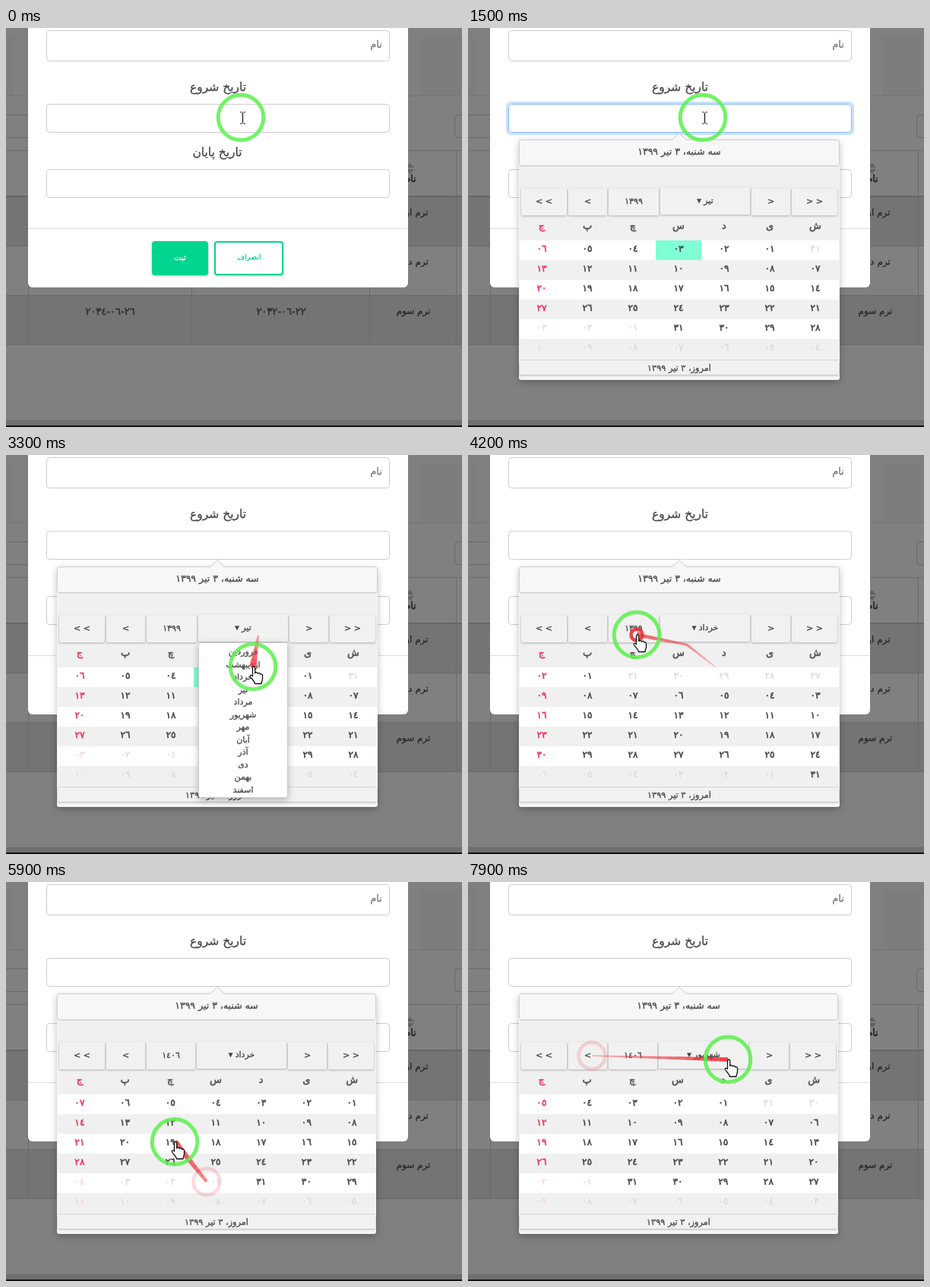
An HTML page that plays this animation: 600x526 px, repeating every 8 s.

```html
<!DOCTYPE html>
<html lang="fa">
<head>
<meta charset="utf-8">
<title>Date picker</title>
<style>
  html, body { margin: 0; width: 100%; height: 100%; overflow: hidden; background: #808080; }
  svg { display: block; width: 600px; height: 526px; }
  text { font-family: "DejaVu Sans", sans-serif; text-anchor: middle; direction: rtl; white-space: pre; stroke-width: .3px; }
  .heavy { stroke-width: .6px; }
  .ltr { direction: ltr; unicode-bidi: bidi-override; }
  .btn { filter: drop-shadow(.5px 1px 1.5px rgba(0, 0, 0, .27)); }
  .pop { filter: drop-shadow(0 3px 5px rgba(0, 0, 0, .25)); }
</style>
</head>
<body>
<svg viewBox="0 0 600 526">
  <g id="page"></g>
  <g id="form"></g>
  <g id="picker"></g>
  <g id="trail"></g>
  <circle id="click" fill="none" stroke="#e8282c" stroke-width="4.5"/>
  <g id="pointer">
    <circle r="29.8" fill="none" stroke="#5cf04f" stroke-width="5" opacity=".86"/>
    <path id="beam" d="M-1 -7h2.5m2 0h2.5M2.5 -6.5v14M-1 8h2.5m2 0h2.5" fill="none" stroke="#111" stroke-width="1.2"/>
    <path id="hand" transform="translate(-1.500 0)" d="M1 1.5C1-.5 4-.5 4.200 1.500V8.500C5 7 7.500 7.300 7.700 9 8.800 7.800 10.800 8.300 11 10 12.400 9.200 14 9.800 14 11.500V16C14 18.500 12.500 19.500 12.500 22.500H4C3.800 19.500 0 16.500-2 13.500-3 11.500-1 10.500 1 12.500Z" fill="#fff" stroke="#111" stroke-width="1.3" stroke-linejoin="round"/>
  </g>
</svg>
<script>
const LOOP = 8000, STEP = 100;
const MONTHS = ["فروردین", "اردیبهشت", "خرداد", "تیر", "مرداد", "شهریور", "مهر", "آبان", "آذر", "دی", "بهمن", "اسفند"];
const DAYS = ["ش", "ی", "د", "س", "چ", "پ", "ج"];
const GREEN = "#00d68f", INK = "#484848";
const $ = id => document.getElementById(id);

// time, x, y of the ring's middle
const PATH = [
  [0, 309, 118], [1900, 309, 118], [2100, 325, 218], [2300, 375, 235], [2400, 363, 230],
  [2600, 338, 238], [3000, 332, 238], [3300, 325, 279], [3850, 325, 279], [3980, 288, 250],
  [4120, 222, 237], [4700, 222, 237], [4970, 237, 296], [5180, 249, 362], [5300, 264, 395],
  [5700, 264, 395], [6100, 180, 290], [6350, 105, 226], [6550, 163, 228], [7560, 163, 229],
  [7900, 342, 234], [8000, 345, 234]
];
const CLICKS = [1000, 2800, 3400, 4200, 5500, 6700, 7100, 7500];

// start, view, year, month index, weekday of day 1
const VIEWS = [
  [0, "none"],
  [1200, "days", 1399, 3, 1],
  [2900, "menu", 1399, 3, 1],
  [3500, "days", 1399, 2, 5],
  [4400, "years"],
  [5600, "days", 1406, 2, 0],
  [6900, "days", 1406, 3, 3],
  [7200, "days", 1406, 4, 6],
  [7600, "days", 1406, 5, 2]
];

const digits = v => String(v).replace(/\d/g, d => String.fromCharCode(0x660 + +d));
const two = n => String(n).padStart(2, "0");
const rect = (x, y, w, h, fill, more = "") =>
  `<rect x="${x}" y="${y}" width="${w}" height="${h}" fill="${fill}" ${more}/>`;
const line = (x1, y1, x2, y2, color, w = 1, more = "") =>
  `<path d="M${x1} ${y1}L${x2} ${y2}" stroke="${color}" stroke-width="${w}" ${more}/>`;
// y is the visual middle of the line
const text = (s, x, y, size, fill = INK, more = "") =>
  `<text x="${x}" y="${(y + size * .36).toFixed(1)}" font-size="${size}" fill="${fill}" stroke="${fill}" ${more}>${digits(s)}</text>`;
const HEAVY = 'class="heavy"', LTR = 'class="ltr"';

function drawPage() {
  let s = rect(0, 0, 600, 526, "#808080");
  s += rect(0, 10, 10, 79, "#7d7d7d") + rect(545, 10, 55, 79, "#7d7d7d");
  s += line(0, 89.5, 600, 89.5, "#737373");
  const box = 'rx="4" stroke="#686868"';
  s += rect(-60.5, 114.5, 120, 30, "#808080", box) + rect(590.5, 114.5, 60, 30, "#808080", box);
  s += rect(0, 222, 600, 65, "#747474") + rect(0, 352, 600, 65, "#747474");
  for (const y of [161.5, 287.5, 352.5, 417.5]) s += line(0, y, 600, y, "#6a6a6a");
  s += line(0, 222, 600, 222, "#666", 2);
  for (const x of [29.5, 244.5, 478.5, 592.5]) s += line(x, 161, x, 417, "#6a6a6a");
  s += '<path d="M526 184l5.5-6 5.5 6zM526 186l5.5 6 5.5-6z" fill="#626262"/>';
  s += text("نام", 532, 198, 12.5, "#222", HEAVY);
  ["اول", "دوم", "سوم"].forEach((n, i) => s += text("ترم " + n, 536, 243 + 65 * i, 12, "#282828"));
  s += text("2034-06-26", 137, 373, 13, "#282828", LTR) + text("2032-06-22", 362, 373, 13, "#282828", LTR);
  s += rect(0, 517, 600, 7, "#6f6f6f") + rect(0, 524, 600, 2, "#111");
  $("page").innerHTML = s;
}

function drawForm() {
  const field = (y, h, id = "") => rect(53.5, y + .5, 451, h, "#fff", `rx="4" stroke="#ccc" ${id}`);
  $("form").innerHTML =
    rect(29, -20, 500, 362, "#fff", 'rx="6"') +
    field(3, 40) + text("نام", 487, 21.5, 13, "#777") +
    text("تاریخ شروع", 279, 77, 15.5) +
    rect(51.5, 98.5, 455, 41, "none", 'id="glow" rx="5" stroke="#c9e1fb" stroke-width="3"') +
    field(100, 37, 'id="start"') +
    line(491.5, 106, 491.5, 133, "#333", 1, 'id="caret"') +
    text("تاریخ پایان", 278, 163, 15.5) + field(186, 37) +
    line(29, 264.5, 529, 264.5, "#ddd") +
    `<g class="btn">${rect(192, 281, 74, 45, GREEN, 'rx="4"')}</g>` +
    text("ثبت", 229, 302, 10, "#fff") +
    `<g class="btn">${rect(275, 282, 89, 43, "#fff", `rx="3" stroke="${GREEN}" stroke-width="2"`)}</g>` +
    text("انصراف", 320, 302, 9.5, GREEN);
}

const panel = (w, h, fill, radius) =>
  `<g class="pop">${rect(67, 147, w, h, fill, `rx="${radius}"`)}</g>` +
  rect(67.5, 147.5, w - 1, 34, "#f7f7f7", 'rx="3" stroke="#d0d0d0"') +
  '<path d="M268 148l10-9.5 10 9.5" fill="#f7f7f7" stroke="#ccc"/>';

const button = (x, w, label, more = "", y = 211, fill = "#f1f1f1") =>
  `<g class="btn">${rect(x, y, w, 36, fill, 'rx="2"')}</g>` + text(label, x + w / 2, y + 16.5, 11, "#444", more);

function drawDays(w, year, month, first, pressed) {
  const mid = 67 + w / 2, shift = w - 422, col = (w - 2) / 7;
  let s = panel(w, 317, "#f5f5f5", 3);
  s += text("سه شنبه، 3 تیر 1399", mid, 162.5, 12.5);
  s += rect(68, 184, w - 2, 96, "#f0f0f0") + line(68, 182.5, 66 + w, 182.5, "#ddd");
  s += button(70, 60, "&lt; &lt;", LTR);
  s += button(132, 51, "&lt;", LTR, 211, pressed ? "#c9c9c9" : "#f1f1f1");
  s += button(185, 66 + shift, year);
  s += button(253 + shift, 118, MONTHS[month] + " ▾", "", 210);
  s += button(373 + shift, 51, "&gt;", LTR);
  s += button(426 + shift, 60, "&gt; &gt;", LTR);
  const cx = c => +(67 + w - 2 - col * (c + .5)).toFixed(1);
  DAYS.forEach((d, c) => s += text(d, cx(c), 260.5, 13, c == 6 ? "#f0355f" : "#555", HEAVY));
  for (let r = 0; r < 6; r++) s += rect(68, 280 + 26 * r, w - 2, 26, r % 2 ? "#f0f0f0" : "#fff");
  for (let i = 0; i < 42; i++) {
    const c = i % 7, y = 280 + 26 * (i / 7 | 0), n = i - first;
    const inside = n >= 0 && n < 31, day = (n + 31) % 31 + 1;
    if (inside && year == 1399 && month == 3 && day == 3) s += rect(cx(c) - 30, y, 60, 26, "#7fffd4");
    const color = c == 6 ? (inside ? "#f0355f" : "#f6d3db") : inside ? "#484848" : "#d9d9d9";
    s += text(two(day), cx(c), y + 11, 12.2, color, inside ? HEAVY : "");
  }
  s += line(68, 437.5, 66 + w, 437.5, "#d8d8d8");
  s += `<g class="btn">${rect(68, 439, w - 2, 18, "#f1f1f1")}</g>`;
  return s + text("امروز، 3 تیر 1399", mid, 448, 11.3);
}

function drawMenu() {
  let s = `<g class="pop">${rect(253.5, 247.5, 117, 204, "#fff", 'rx="3" stroke="#ccc"')}</g>`;
  MONTHS.forEach((m, i) => s += text(m, 312, 259 + 16.5 * i, 11));
  return s;
}

function drawYears() {
  let s = panel(422, 351, "#fff", 0) + rect(68, 151, 420, 67, "#f7f7f7");
  s += line(68, 218.5, 488, 218.5, "#ddd");
  s += text("1384 – 1414", 278, 187, 13);
  s += text("&lt;", 112, 187, 13, "#222", LTR) + text("&gt;", 443, 187, 13, "#222", LTR);
  for (let i = 0; i < 30; i++) {
    const x = 406.5 - 84.6 * (i % 5), y = 219.5 + 39.2 * (i / 5 | 0);
    s += `<g class="btn">${rect(x, y, 82, 35, i == 22 ? "#ededed" : "#f1f1f1", 'rx="2"')}</g>`;
    s += text(1384 + i, x + 40.5, y + 17, 11, "#444");
  }
  return s;
}

function posAt(t) {
  t = Math.max(0, t);
  const i = Math.max(1, PATH.findIndex(p => p[0] >= t));
  const [t0, x0, y0] = PATH[i - 1], [t1, x1, y1] = PATH[i];
  const u = (t - t0) / (t1 - t0);
  return [x0 + (x1 - x0) * u, y0 + (y1 - y0) * u];
}

// The streak is thinner where the pointer moves faster.
function drawTrail(t) {
  const span = 350, parts = 16, dt = span / parts;
  let s = "";
  for (let i = 0; i < parts; i++) {
    const u = i / parts, from = t - span + i * dt;
    const [x1, y1] = posAt(from), [x2, y2] = posAt(from + dt);
    const speed = Math.hypot(x2 - x1, y2 - y1) / dt;
    if (speed < .02) continue;
    const w = 1.5 + u * Math.min(8, 2.2 / speed);
    s += line(x1, y1, x2, y2, "#ee2a30", w.toFixed(2), `opacity="${(.3 + .6 * u).toFixed(2)}"`);
  }
  $("trail").innerHTML = s;
}

let shown = "";
function drawPicker(t) {
  const [, kind, year, month, first] = VIEWS.filter(v => v[0] <= t).pop();
  const pressed = t >= 6600 && t < 7600;
  const key = [kind, year, month, pressed].join();
  if (key == shown) return;
  shown = key;
  let s = "";
  if (kind == "years") s = drawYears();
  else if (kind != "none") s = drawDays(year == 1406 ? 420 : 422, year, month, first, pressed);
  if (kind == "menu") s += drawMenu();
  $("picker").innerHTML = s;
}

function draw(t) {
  const focus = t >= 1000 && t < 2900;
  $("glow").setAttribute("opacity", focus ? 1 : 0);
  $("start").setAttribute("stroke", focus ? "#80bdff" : t >= 2900 && t < 5600 ? "#c9ccdc" : "#ccc");
  $("caret").setAttribute("opacity", focus && t % 1000 < 500 ? 1 : 0);
  drawPicker(t);
  drawTrail(t);

  const hit = CLICKS.filter(c => c <= t).pop(), age = t - hit;
  const live = age < 500;
  $("click").setAttribute("opacity", live ? .85 * (1 - age / 500) : 0);
  if (live) {
    const [x, y] = posAt(hit);
    $("click").setAttribute("cx", x);
    $("click").setAttribute("cy", y);
    $("click").setAttribute("r", 7.5 + age / 40);
  }

  const [x, y] = posAt(t);
  $("pointer").setAttribute("transform", `translate(${x.toFixed(1)} ${y.toFixed(1)})`);
  $("beam").setAttribute("opacity", y < 146 ? 1 : 0);
  $("hand").setAttribute("opacity", y < 146 ? 0 : 1);
}

drawPage();
drawForm();
const begin = performance.now();
let last = -1;
function tick() {
  const t = Math.floor((performance.now() - begin) % LOOP / STEP) * STEP;
  if (t != last) draw(last = t);
  requestAnimationFrame(tick);
}
tick();
</script>
</body>
</html>
```
